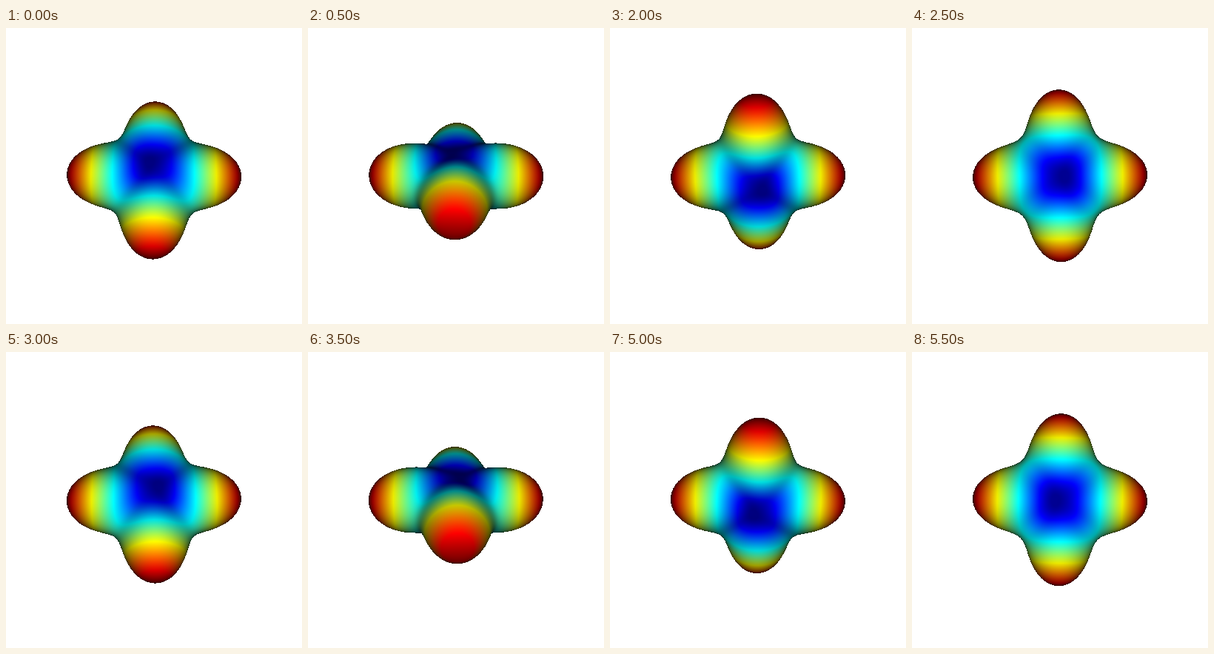
These frames come from a looping animation (400 by 400 pixels, 6 s). An HTML page with a canvas:

```html
<!DOCTYPE html>
<html lang="en">
<head>
<meta charset="utf-8">
<title>Rotating lobed surface</title>
<style>
html, body { margin: 0; width: 100%; height: 100%; overflow: hidden; background: #fff; }
canvas { display: block; width: 400px; height: 400px; }
</style>
</head>
<body>
<canvas id="stage" width="400" height="400"></canvas>
<script>
const ctx = document.getElementById('stage').getContext('2d');
const SIZE = 400, MID = 200;
const STEPS = 12, HOLD = 500;
const EYE = 700;                // distance from the eye to the centre
const POLE = 38, LOBE = 79.5;   // radius at the pole, extra radius at the tips
const ROUND = 0.2;              // share of the squared term in the rise from the pole
const NECK = 172;               // depth of the notch between lobes
const SHORT = 1.5;              // the second pair of lobes is a little shorter
const SKEW = 7;                 // moves the lowest point off the pole
const BOUND = 122, STRIDE = 4;
const ROLL = 0.018, START = 29 * Math.PI / 180;
const cosRoll = Math.cos(ROLL), sinRoll = Math.sin(ROLL);

let cosA = 1, sinA = 0;

// Radius of the surface in the direction of a view-space point.
function radius(x, y, z) {
  const v = y * cosA + z * sinA;
  const w = z * cosA - y * sinA;
  const bx = x * cosRoll + v * sinRoll;
  const by = v * cosRoll - x * sinRoll;
  const len2 = bx * bx + by * by + w * w + 1e-9;
  const xx = bx * bx / len2, yy = by * by / len2, s = xx + yy;
  const rise = LOBE * s * (ROUND + (1 - ROUND) * s);
  return POLE + rise - NECK * xx * yy - SHORT * yy * yy
    + SKEW * bx * w * w * w / (len2 * len2);
}

const field = (x, y, z) => Math.sqrt(x * x + y * y + z * z) - radius(x, y, z);

const clamp = v => Math.max(0, Math.min(1, v));
const ramp = (v, mid) => clamp(1.5 - Math.abs(4 * v - mid));

// Depth where the ray through (px, py) meets the surface, or null.
function hit(px, py) {
  const at = z => {
    const k = 1 - z / EYE;
    return field(px * k, py * k, z);
  };
  const reach = BOUND * BOUND - (px * px + py * py) * 0.96;
  if (reach < 0) return null;
  const far = Math.sqrt(reach) + STRIDE;
  for (let z = far; z > -far; z -= STRIDE) {
    if (at(z) > 0) continue;
    let lo = z, hi = z + STRIDE;
    for (let i = 0; i < 8; i++) {
      const mid = (lo + hi) / 2;
      if (at(mid) > 0) hi = mid; else lo = mid;
    }
    return lo;
  }
  return null;
}

function shade(x, y, z) {
  const e = 0.3;
  const nx = field(x + e, y, z) - field(x - e, y, z);
  const ny = field(x, y + e, z) - field(x, y - e, z);
  const nz = field(x, y, z + e) - field(x, y, z - e);
  const ez = EYE - z;
  const facing = (ez * nz - x * nx - y * ny) / (Math.hypot(nx, ny, nz) * Math.hypot(x, y, ez));
  const light = 255 * (0.12 + 0.88 * clamp(facing));
  const v = 0.02 + 0.93 * clamp((radius(x, y, z) - POLE) / LOBE);
  return [ramp(v, 3) * light, ramp(v, 2) * light, ramp(v, 1) * light];
}

function render(step) {
  const angle = START + step * 2 * Math.PI / STEPS;
  cosA = Math.cos(angle);
  sinA = Math.sin(angle);
  const img = ctx.createImageData(SIZE, SIZE);
  img.data.fill(255);
  for (let j = 70; j < 330; j++) {
    for (let i = 70; i < 330; i++) {
      const px = i + 0.5 - MID, py = j + 0.5 - MID;
      const z = hit(px, py);
      if (z === null) continue;
      const k = 1 - z / EYE;
      img.data.set(shade(px * k, py * k, z), (j * SIZE + i) * 4);
    }
  }
  return img;
}

const poses = [];
let shown = -1;

function draw(now) {
  const step = Math.floor(now / HOLD) % STEPS;
  if (step !== shown) {
    poses[step] = poses[step] || render(step);
    ctx.putImageData(poses[step], 0, 0);
    shown = step;
  }
  requestAnimationFrame(draw);
}
draw(performance.now());
</script>
</body>
</html>
```
